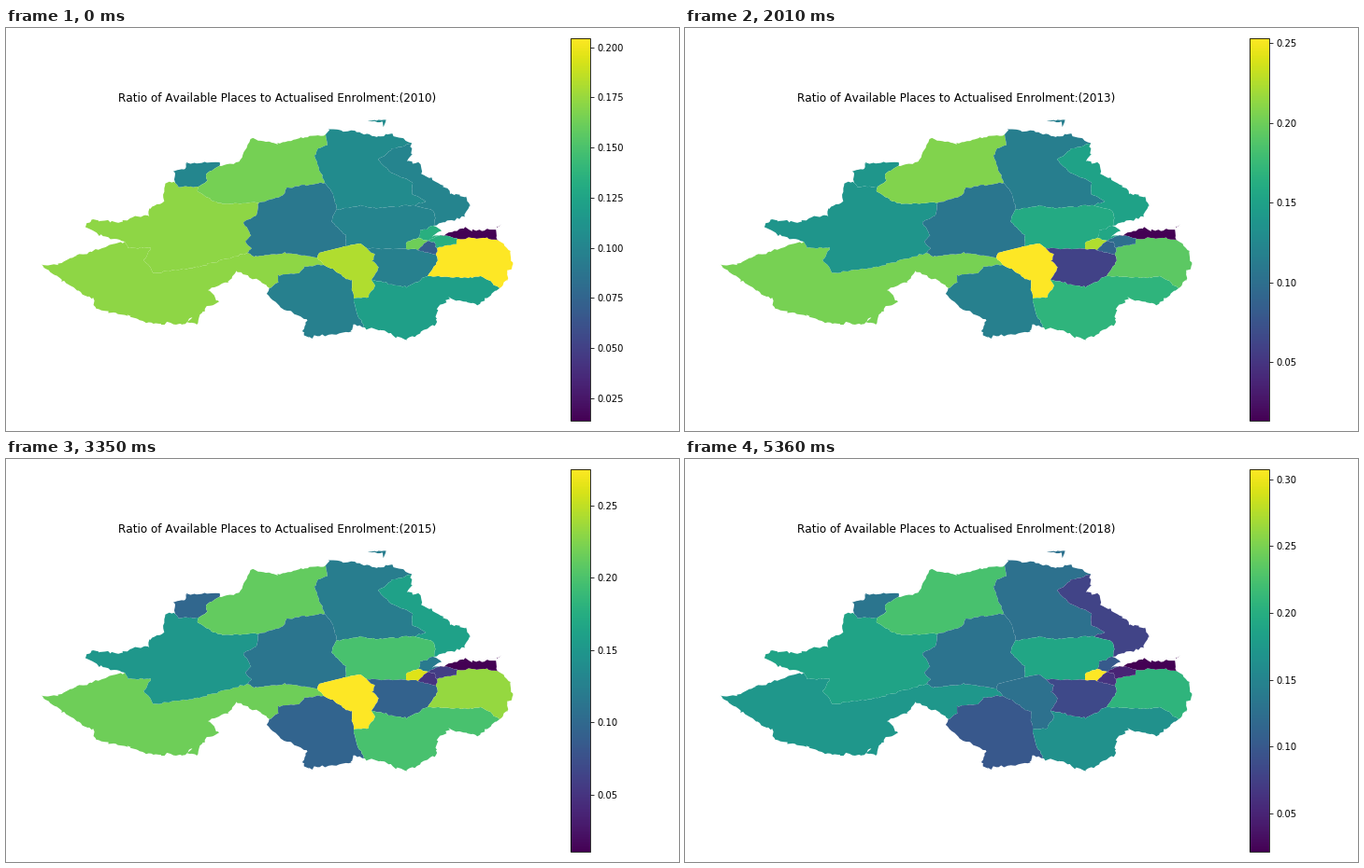
A matplotlib script for the animation above (8040 ms loop, 720 px wide and 432 px high).

```python
import numpy as np
import matplotlib.pyplot as plt
from matplotlib.animation import FuncAnimation
from matplotlib.cm import ScalarMappable
from matplotlib.collections import PolyCollection
from matplotlib.colors import Normalize

W, H, DPI = 720, 432, 72
YEARS, BEATS = 9, 12
rng = np.random.default_rng(4)
plt.rcParams["font.family"] = "DejaVu Sans"
plt.rcParams["text.kerning_factor"] = 6


def arc(*xy, rough=0.5):
    """A line through a few key points, made ragged by seeded jitter."""
    knots = np.reshape(xy, (-1, 2)).astype(float)
    steps = np.hypot(*np.diff(knots, axis=0).T)
    s = np.concatenate([[0], np.cumsum(steps)])
    t = np.union1d(s, np.arange(0, s[-1], 3))
    line = np.column_stack([np.interp(t, s, knots[:, k]) for k in (0, 1)])
    line[1:-1] += rng.normal(0, rough, line[1:-1].shape)
    line[0], line[-1] = knots[0], knots[-1]
    return [tuple(p) for p in line]


def coast(*xy):
    return arc(*xy, rough=0.8)


def ring(*arcs):
    """Join arcs into one outline, turning each to meet the last."""
    line = list(arcs[0])
    if line[-1] not in (arcs[1][0], arcs[1][-1]):
        line.reverse()
    for a in arcs[1:]:
        line += (a if a[0] == line[-1] else a[::-1])[1:]
    return line


def at(n, keys):
    """Value n years after the first, between the key years."""
    return np.interp(n, list(keys), list(keys.values()))


# Coastlines, one per division
coast_a = coast(282, 279, 270, 269, 246, 262, 238, 272, 217, 280, 227, 293,
                212, 302, 204, 317, 194, 315, 201, 309, 190, 317, 165, 317,
                150, 316, 130, 308, 96, 301, 92, 290, 60, 271, 37, 254,
                54, 254, 75, 244, 127, 229)
coast_b = coast(127, 229, 100, 222, 85, 212, 92, 206, 125, 209, 135, 203,
                153, 201, 154, 193, 168, 187, 171, 167, 181, 166)
coast_c = coast(181, 166, 180, 153, 191, 151, 192, 145, 228, 144, 228, 148)
coast_d = arc(228, 148, 250, 143, 262, 119, 290, 124, 318, 117, 342, 114)
coast_f = coast(342, 114, 346, 108, 380, 112, 398, 117, 411, 113, 434, 124)
coast_g = coast(434, 124, 434, 135, 429, 143, 444, 147, 444, 156, 468, 169,
                476, 177, 492, 181, 496, 191, 490, 202, 457, 212)
coast_o = arc(457, 212, 466, 217, 456, 223, 465, 222)
coast_n = coast(465, 222, 490, 215, 505, 217, 524, 216, 527, 228)
coast_m = coast(527, 228, 539, 239, 543, 253, 537, 260, 536, 270, 528, 279)
coast_l = coast(528, 279, 505, 296, 474, 290, 461, 301, 460, 318, 428, 334,
                400, 324, 384, 321)
coast_i = coast(384, 321, 371, 318, 369, 325, 324, 332, 317, 325, 322, 312,
                298, 302, 280, 287, 282, 279)

# Inner borders
ab = arc(127, 229, 130, 235, 155, 236, 148, 249, 158, 263, 205, 256, 258, 241)
ae = arc(258, 241, 266, 245, 300, 241, 333, 246)
aj = arc(333, 246, 340, 254)
ai = arc(340, 254, 319, 256, 314, 263, 291, 265, 291, 272, 282, 279)
bc = arc(181, 166, 185, 170, 206, 170)
bd = arc(206, 170, 205, 175, 219, 184, 232, 189, 271, 187)
be = arc(271, 187, 268, 200, 254, 208, 262, 222, 256, 229, 262, 236, 258, 241)
cd = arc(228, 148, 214, 157, 215, 164, 206, 170)
de = arc(271, 187, 296, 180, 301, 171, 341, 166)
df = arc(342, 114, 344, 126, 333, 129, 330, 137, 341, 166)
ef = arc(341, 166, 350, 178, 354, 194)
eh = arc(354, 194, 348, 207, 363, 222, 363, 234)
ej = arc(333, 246, 335, 241, 363, 234, rough=0.2)
fg = arc(434, 124, 413, 130, 398, 141, 412, 155, 435, 165, 434, 177,
         449, 186, 437, 190)
fh = arc(354, 194, 380, 191, 400, 193, 437, 190)
gh = arc(437, 190, 457, 196, 459, 206, 457, 212)
hj = arc(363, 234, 379, 231, 386, 236, rough=0.2)
hk = arc(386, 236, 428, 237)
hp = arc(428, 237, 428, 230, 441, 225)
ho = arc(441, 225, 444, 217, 457, 212)
op = arc(441, 225, 452, 228)
o_r = arc(452, 228, 465, 222)
pq = arc(452, 228, 440, 238)
pk = arc(428, 237, 440, 238)
qr = arc(452, 228, 459, 230, 461, 236)
qm = arc(461, 236, 460, 243)
qk = arc(440, 238, 460, 243)
rn = arc(465, 222, 483, 226)
rm = arc(483, 226, 482, 231, 461, 236)
nm = arc(483, 226, 515, 225, 527, 228)
km = arc(460, 243, 462, 250, 451, 266)
ml = arc(451, 266, 495, 268, 508, 265, 528, 279)
kl = arc(451, 266, 428, 278, 391, 270)
jk = arc(386, 236, 395, 243, 392, 249, 399, 257, 391, 270)
jl = arc(391, 270, 395, 276, 387, 289, 372, 290)
ji = arc(340, 254, 350, 259, 363, 268, 370, 270, 372, 290)
il = arc(372, 290, 375, 305, 384, 321)

shapes = [
    ("A", ring(coast_a, ab, ae, aj, ai)),
    ("B", ring(coast_b, bc, bd, be, ab)),
    ("C", ring(coast_c, cd, bc)),
    ("D", ring(coast_d, df, de, bd, cd)),
    ("E", ring(be, de, ef, eh, ej, ae)),
    ("F", ring(coast_f, fg, fh, ef, df)),
    ("F", arc(387, 99, 407, 98, 404, 106, 403, 101, 387, 99)),
    ("G", ring(coast_g, gh, fg)),
    ("H", ring(fh, gh, ho, hp, hk, hj, eh)),
    ("I", ring(coast_i, ai, ji, il)),
    ("J", ring(ej, hj, jk, jl, ji, aj)),
    ("K", ring(hk, pk, qk, km, kl, jk)),
    ("L", ring(coast_l, il, jl, kl, ml)),
    ("M", ring(coast_m, ml, km, qm, rm, nm)),
    ("N", ring(coast_n, nm, rn)),
    ("N", arc(525, 213, 529, 210, 526, 214)),
    ("O", ring(coast_o, o_r, op, ho)),
    ("P", ring(hp, op, pq, pk)),
    ("Q", ring(pq, qr, qm, qk)),
    ("R", ring(o_r, rn, rm, qr)),
]

# Turning points of each division's level within the scale, by year
levels = {
    "A": {0: .83, 2: .86, 4: .73, 5: .78, 7: .53},
    "B": {0: .83, 2: .61, 4: .43, 5: .53, 8: .58},
    "C": {0: .46, 2: .61, 4: .44, 5: .33, 8: .39},
    "D": {0: .79, 2: .87, 4: .75, 5: .76, 7: .87, 8: .71},
    "E": {0: .40, 8: .38},
    "F": {0: .48, 2: .49, 4: .36, 5: .42, 7: .37},
    "G": {0: .45, 4: .62, 5: .57, 7: .44, 8: .20},
    "H": {0: .45, 5: .71, 8: .59},
    "I": {0: .43, 4: .43, 5: .32, 8: .27},
    "J": {0: .88, 2: 1, 5: 1, 7: .45, 8: .37},
    "K": {0: .43, 2: .14, 5: .31, 8: .22},
    "L": {0: .56, 5: .71, 7: .67, 8: .50},
    "M": {0: 1, 2: .70, 5: .84, 8: .65},
    "N": {0: 0},
    "O": {0: .63, 2: .69, 5: .41, 8: .28},
    "P": {0: .78, 5: .95, 7: 1},
    "Q": {0: .30, 4: .32, 5: .15},
    "R": {0: .63, 5: .18, 8: .10},
}
low = {0: .0138, 1: .0130, 2: .0149, 5: .0106, 7: .0192, 8: .0214}
high = {0: .2045, 2: .2328, 4: .2734, 5: .2750, 6: .2525, 7: .3196, 8: .3075}

fig = plt.figure(figsize=(W / DPI, H / DPI), dpi=DPI, facecolor="white")
ax = fig.add_axes([0, 0, 1, 1])
ax.set(xlim=(0, W), ylim=(H, 0))
ax.axis("off")
cmap = plt.get_cmap("viridis")
land = PolyCollection([s for _, s in shapes], edgecolors="none", linewidths=0)
ax.add_collection(land, autolim=False)
title = ax.text(290.3, 79, "", fontsize=12, ha="center", va="baseline")

cax = fig.add_axes([604.4 / W, 11 / H, 20.5 / W, 410 / H])
scale = ScalarMappable(Normalize(low[0], high[0]), cmap)
fig.colorbar(scale, cax=cax)
cax.tick_params(labelsize=10)


def draw(i):
    n = min(i, YEARS - 1)
    now = {k: at(n, keys) for k, keys in levels.items()}
    top = max(now.values())
    land.set_facecolor([cmap(now[k] / top) for k, _ in shapes])
    scale.set_clim(at(n, low), at(n, high))
    title.set_text("Ratio of Available Places to Actualised Enrolment:"
                   f"({2010 + n})")
    return land, title


# One beat per year; the last year holds for the rest of the loop
anim = FuncAnimation(fig, draw, frames=BEATS, interval=670, repeat=True,
                     repeat_delay=0, init_func=lambda: draw(0))
plt.show()
```
